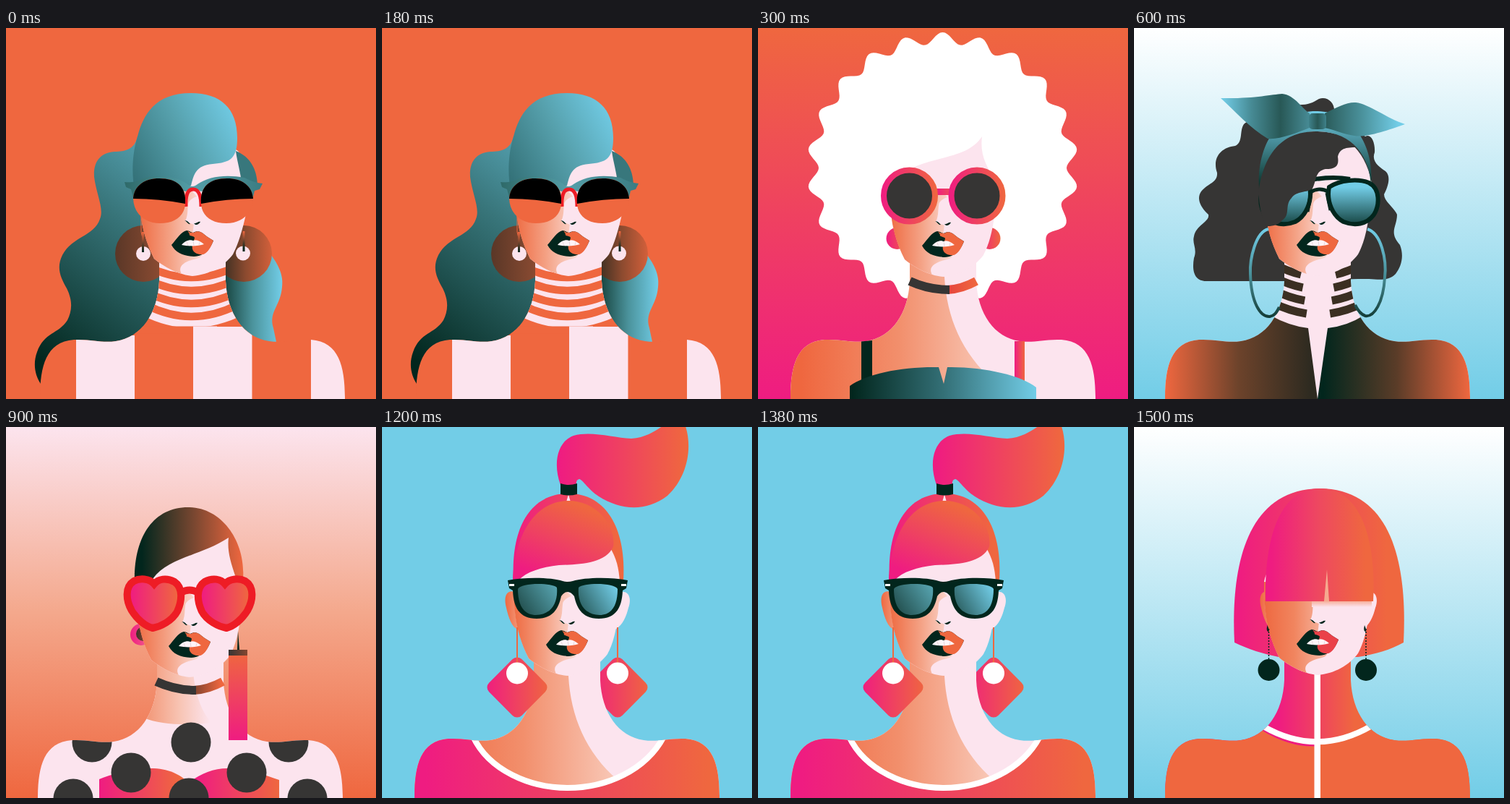
These frames come from a looping animation (512 px wide and 513 px high, 1.8 s). An HTML page:

```html
<!DOCTYPE html>
<html lang="en">
<head>
<meta charset="utf-8">
<title>Six portraits</title>
<style>
html, body { margin: 0; width: 100%; height: 100%; overflow: hidden; }
svg { display: block; width: 100%; height: 100%; }
</style>
</head>
<body>
<svg id="stage" viewBox="0 0 512 513" preserveAspectRatio="none"></svg>
<script>
const STEP = 300;
const CORAL = '#ef673f', PINK = '#fce4ee', MAGENTA = '#ef1c81', CYAN = '#72cde7';
const GREEN = '#02261d', COAL = '#363534', RED = '#ee1c25', WHITE = '#fff';

let defs = '', count = 0;

// Gradient between two points, stops evenly spread.
function lin(x1, y1, x2, y2, ...stops) {
  const id = 'g' + count++;
  const list = stops.map((c, i) => `<stop offset="${i / (stops.length - 1)}" stop-color="${c}"/>`).join('');
  defs += `<linearGradient id="${id}" gradientUnits="userSpaceOnUse" x1="${x1}" y1="${y1}" x2="${x2}" y2="${y2}">${list}</linearGradient>`;
  return `url(#${id})`;
}
const across = (x1, x2, ...stops) => lin(x1, 0, x2, 0, ...stops);
const down = (y1, y2, ...stops) => lin(0, y1, 0, y2, ...stops);

const shape = (d, fill) => `<path d="${d}" fill="${fill}"/>`;
const line = (d, stroke, width) => `<path d="${d}" fill="none" stroke="${stroke}" stroke-width="${width}"/>`;
const disc = (x, y, r, fill) => `<circle cx="${x}" cy="${y}" r="${r}" fill="${fill}"/>`;
const box = (x, y, w, h, fill) => `<rect x="${x}" y="${y}" width="${w}" height="${h}" fill="${fill}"/>`;
const back = fill => box(0, 0, 512, 513, fill);
const move = (x, y, s) => `<g transform="translate(${x} ${y})">${s}</g>`;
const flip = (axis, s) => `<g transform="translate(${2 * axis} 0) scale(-1 1)">${s}</g>`;

const BODY = 'M45 520V513C45 470 52 434 92 431C118 430 130 436 150 433C185 428 208 395 210 350V315H302V350C304 395 327 428 362 433C382 436 394 430 420 431C460 434 467 470 467 513V520Z';
defs += `<clipPath id="body"><path d="${BODY}"/></clipPath>`;

// Contents keep stage coordinates while the clip follows the body.
const inBody = (x, y, s) => move(x, y, `<g clip-path="url(#body)">${move(-x, -y, s)}</g>`);

const SKIN = across(60, 330, CORAL, '#f28f6c', '#f9cbbb');
const skin = () => inBody(0, 0, back(PINK) +
  shape('M40 520V310H200L258 344C261 400 282 450 326 488V520Z', SKIN));

const SHADE = across(186, 264, '#ef7048', '#f4a184', '#fbd6ce');

function lips(upper) {
  return shape('M227 301C234 293 240 283 248 281C252 281 254 284 257 284C262 281 268 282 273 287C278 291 282 293 285 295C281 305 275 316 258 317C243 316 233 312 227 301Z', GREEN) +
    shape('M249 281C253 285 255 283 258 284C262 281 268 282 273 287C278 291 282 293 285 295C281 305 277 312 271 314C262 315 254 310 256 302L259 291C258 288 250 289 252 286Z', upper) +
    shape('M241 301C245 296 252 293 257 295C262 293 267 296 272 300C264 303 250 303 241 301Z', '#fff4f8') +
    line('M248 297L250 302M257 295L258 302M266 297L265 301', '#d9c3cb', .6);
}

function face(x, y, { top = 'C190 165 300 130 331 215', shade = SHADE, upper = CORAL } = {}) {
  return move(x, y,
    shape(`M182 215${top}C328 270 322 295 312 314C300 330 280 342 256 344C235 342 215 330 203 320C186 285 183 260 182 215Z`, PINK) +
    shape('M182 215C182 262 187 288 203 320C212 328 228 337 241 341C234 329 248 323 262 320C268 318 270 316 268 312L256 284C258 278 257 275 258 273L246 268C250 260 249 252 250 245C250 240 256 236 262 234L254 225Z', shade) +
    shape('M245 267C248 268 250 273 253 272C251 270 249 267 245 267ZM258 271C261 272 264 268 267 269C264 274 260 274 258 271Z', GREEN) +
    lips(upper));
}

function ears(left, right) {
  return move(left, 0, shape('M184 228C172 224 168 235 172 250C176 268 182 280 190 280Z', across(170, 190, CORAL, '#f39a7b'))) +
    move(right, 0, shape('M330 228C341 226 346 236 341 250C337 266 331 276 322 280Z', PINK));
}

function choker(x, y, right) {
  return move(x, y, line('M262 362Q282 361 302 350', right, 12) + line('M210 350Q236 362 265 362', COAL, 12));
}

function waves() {
  const hair = lin(60, 470, 330, 110, GREEN, '#38757a', CYAN);
  const rim = across(165, 355, '#2f6a69', '#559fa9', '#3b7c82');
  const upper = 'C177 218 192 208 212 208C236 208 250 219 248 243';
  const lens = shape(`M176 236${upper}C247 260 234 270 213 270C192 270 177 257 176 236Z`, CORAL) +
    shape(`M176 236${upper}Q212 236 176 236Z`, '#000');
  const neck = [0, 1, 2, 3].map(i => line(`M194 ${329 + 18 * i}Q257 ${361 + 18 * i} 320 ${329 + 18 * i}`, CORAL, 10.5)).join('');
  return back(CORAL) +
    shape('M355 300C372 318 385 338 382 358C380 385 363 392 370 415L374 434L330 440L290 380V325Z', across(300, 382, '#143f39', '#4b939c', CYAN)) +
    shape('M182 150C178 168 165 171 150 171C126 173 121 190 122 206C125 230 136 250 130 264C122 288 92 288 78 314C69 332 76 346 84 360C93 378 91 392 85 404C72 424 53 420 43 448C37 464 40 480 48 492L60 460L220 450L230 220Z', hair) +
    disc(190, 312, 39, across(151, 220, '#5a3727', '#8f4d33')) +
    disc(329, 312, 39, across(295, 368, '#2e2a20', '#8b4a2f', '#d3603b')) +
    inBody(2, 0, back(CORAL) +
      shape('M185 310H330V396Q257 432 190 398Z', PINK) + neck +
      box(178, 412.5, 162, 10, CORAL) +
      box(97, 425, 81, 90, PINK) + box(259, 412.5, 81.5, 105, PINK) + box(422, 425, 60, 90, PINK) +
      shape('M292 412C305 410 315 405 322 398L340 413H292Z', CORAL)) +
    face(2, -1, { top: 'C190 180 300 150 320 172C328 190 333 200 336 230' }) +
    shape('M318 170C338 178 347 195 348 216H326C325 200 320 186 318 170Z', '#38777c') +
    shape('M178 225C174 205 174 175 182 150C190 120 206 90 256 90C297 90 320 111 320 152C320 181 310 186 286 188C262 190 260 203 256 218L230 225Z', lin(175, 200, 325, 120, '#35737a', '#56a0ac', CYAN)) +
    line('M187 250V282Q190 292 190 301', CORAL, 1) +
    disc(190, 312, 10, PINK) + disc(328, 311.5, 10, PINK) +
    box(188, 282, 3, 28, down(282, 310, CORAL, GREEN)) + box(327.5, 281, 3, 28, down(281, 305, CORAL, GREEN)) +
    shape('M164 213L166 220L173 223L177 238L212 220L249 226Q259 219 270 226L310 220L341 238L344 225L351 223L355 215C345 214 340 212 330 207C305 202 280 205 265 216C260 220 255 220 250 215C235 204 205 202 190 208C180 213 172 214 164 213Z', rim) +
    line('M249 247C248 228 253 223 259 223C266 223 270 229 270 247', RED, 5) +
    lens + flip(259, lens);
}

function afro() {
  let puff = '';
  for (let i = 0; i < 360; i++) {
    const a = i * Math.PI / 180, r = 179.5 + 8 * Math.cos(22 * a);
    puff += `${i ? 'L' : 'M'}${(255.5 + r * Math.sin(a)).toFixed(1)} ${(193.5 - r * Math.cos(a)).toFixed(1)}`;
  }
  const stud = x => disc(x, 291, 15, across(x - 15, x + 15, MAGENTA, CORAL));
  const ring = x => `<circle cx="${x}" cy="232" r="35.5" fill="${COAL}" stroke="${across(x - 39, x + 39, MAGENTA, CORAL)}" stroke-width="8"/>`;
  return back(down(0, 513, CORAL, MAGENTA)) + shape(puff + 'Z', WHITE) +
    stud(192.5) + stud(320.5) + skin() +
    face(0, 0, { top: 'C225 172 285 188 310 150C307 175 315 190 331 215' }) +
    choker(0, 0, across(262, 302, '#e6443c', CORAL)) +
    shape('M143 433.5L158 432V490H143Z', GREEN) +
    box(355, 433, 14, 55, across(355, 369, MAGENTA, CORAL)) +
    shape('M127 513V495C150 478 200 468 250 469L257 492L262 469C310 468 365 480 385 497V513Z', across(130, 385, GREEN, '#347077', CYAN)) +
    box(246, 222, 20, 9, across(246, 266, MAGENTA, '#ee4a5c')) + ring(209.5) + ring(303);
}

function bow() {
  const bar = '#3b2f22';
  const lens = `<path d="M270 220C285 210 310 208 325 214C341 222 340 245 332 258C322 272 305 274 290 268C275 260 266 240 270 220Z" fill="${down(220, 276, CYAN, '#0f3a35')}" stroke="${GREEN}" stroke-width="6"/>`;
  const bars = [0, 1, 2, 3].map(i => {
    const y = 332 + 18 * i;
    return line(`M192 ${y - 6}Q214 ${y + 5} ${231 + 2.6 * i} ${y + 9}`, bar, 11) +
      line(`M${279 - 2.6 * i} ${y + 9}Q296 ${y + 5} 318 ${y - 6}`, bar, 11);
  }).join('');
  const hoop = down(278, 398, CYAN, '#4b939d', '#153f3a');
  return back(down(0, 513, WHITE, CYAN)) +
    shape('M222 106C240 107 246 104 256 98C268 94 279 104 277 118L320 150C328 145 334 158 333 172C328 185 340 192 348 198C357 206 350 222 346 230C346 240 360 248 364 258C364 275 352 282 368 300C374 315 370 330 362 340C352 350 340 348 325 347L310 347L210 350L100 350C83 350 80 335 83 318C88 305 80 298 83 288C86 272 105 268 103 258C92 248 86 236 93 226C103 214 116 214 115 200C108 180 120 165 140 163C152 158 145 140 153 132C160 126 170 126 180 130Z', COAL) +
    inBody(-2, 0, back(PINK) + bars +
      shape('M30 425L190 398Q215 412 241 415L254 513V520H30Z', across(43, 245, CORAL, '#6d432b', '#2d2a20')) +
      shape('M475 425L317 398Q295 412 268 415L254 513V520H475Z', across(262, 465, GREEN, '#5a3c28', CORAL))) +
    face(-2, -1, { top: 'C190 130 310 110 331 215' }) +
    line('M186 278C168 282 160 320 161 340C162 380 175 400 188 399C194 398 197 394 201 386', hoop, 4) +
    line('M323 278C342 284 350 320 347 345C345 380 332 400 320 398C314 396 310 391 306 383', hoop, 4) +
    flip(256.5, lens) + lens +
    line('M248 209.500Q275 205 299 209', GREEN, 6) + line('M244 227Q257 219 270 227', GREEN, 5) +
    line('M245 228L240 254M267 228L272 252', GREEN, 5) +
    shape('M182 274C172 250 171 225 174 205C180 175 205 143 252 143C278 143 298 152 312 165C295 165 285 165 282 178C284 190 280 195 265 195C250 198 253 210 247 222C240 228 225 225 218 235C208 245 217 258 205 266C198 274 190 274 182 274Z', COAL) +
    shape('M173 222C170 160 200 115 252 115C305 115 333 165 328 218C326 180 305 143 252 143C200 143 180 180 173 222Z', down(115, 218, CYAN, '#3f818a', '#0b322a')) +
    shape('M120 97C165 98 190 92 205 91C222 92 235 114 243 118V138C225 145 200 155 185 153C160 138 140 115 120 97Z', across(122, 243, CYAN, '#478b95', '#285856', '#478b95')) +
    shape('M264 118C280 110 295 102 307 103C325 105 350 125 375 133C350 142 320 152 305 149C290 147 275 140 264 138Z', across(264, 366, '#2a5b5a', '#4a919b', CYAN)) +
    `<rect x="242" y="118" width="24" height="22" rx="5" fill="${across(242, 266, '#3f818a', '#285856', '#3f818a')}"/>`;
}

function hearts() {
  const heart = 'M205 217C198 209 185 209 177 213C164 221 166 240 174 254C182 267 194 276 203 278C214 276 230 268 237 255C244 240 245 222 233 214C222 208 211 210 205 217Z';
  const glass = (a, b) => `<path d="${heart}" fill="${across(172, 238, a, b)}" stroke="${RED}" stroke-width="10"/>`;
  const dots = [[119, 436], [391, 436], [256, 436], [173, 478], [333, 478], [93, 514], [417, 514], [253, 513]];
  return back(down(0, 513, PINK, '#f4a88c', CORAL)) +
    disc(187, 287, 15, across(172, 200, MAGENTA, '#f2658c')) + disc(190, 286, 10, across(180, 198, '#3e3028', '#9b4d34')) +
    inBody(-1, 2, back(PINK) +
      shape('M190 315H258C258 360 268 392 285 409C250 413 215 412 190 402Z', across(200, 283, '#f39d7f', '#f8c5b5', PINK)) +
      shape('M129 513V487C145 480 170 474 200 472C225 472 240 480 253 492V513Z', across(129, 240, MAGENTA, CORAL)) +
      shape('M253 513V492C270 478 290 471 310 472C340 474 360 482 378 488V513Z', across(262, 378, MAGENTA, CORAL)) +
      dots.map(([x, y]) => disc(x, y, 27.5, COAL)).join('')) +
    face(-2, 2, { top: 'C190 165 270 130 312 148C312 170 320 190 329 215' }) +
    choker(-2, 2, across(255, 300, '#6b3c2a', CORAL)) +
    shape('M178 210C178 150 205 111 252 111C300 111 332 160 328 210L318 208C310 185 306 170 308 153C270 178 225 180 203 210Z', across(188, 328, GREEN, '#764630', CORAL)) +
    glass(MAGENTA, CORAL) + flip(254, glass(CORAL, MAGENTA)) +
    line('M242 229Q254 222 266 229', RED, 10) +
    shape('M321 282L323 308H320Z', GREEN) +
    box(308, 308, 26, 125, down(312, 433, CORAL, MAGENTA)) + box(308, 308, 26, 8, across(308, 334, COAL, '#844630'));
}

function ponytail() {
  const tile = x => `<rect x="${x - 32}" y="328" width="64" height="64" rx="9" transform="rotate(45 ${x} 360)" fill="${lin(x - 32, 392, x + 32, 328, MAGENTA, CORAL)}"/>`;
  const drop = x => line(`M${x} 277V330`, CORAL, 2) + disc(x, 340.5, 15, WHITE);
  const neckline = 'M126 428C148 475 205 499 257 499C310 499 365 475 390 428';
  const lens = 'M188 224C192 215 235 215 242 222C244 245 232 260 213 260C195 260 188 245 188 224Z';
  return back(CYAN) + tile(326) + skin() +
    inBody(0, 0, shape(`${neckline}H480V520H30V428Z`, across(60, 450, MAGENTA, CORAL)) + line(neckline, WHITE, 8)) +
    ears(0, 0) +
    shape('M182 212C178 140 205 92 258 92C310 92 338 140 334 212Z', across(182, 325, MAGENTA, CORAL)) +
    face(0, 0, { top: 'C190 165 300 150 315 166C324 180 328 195 329 215' }) +
    shape('M181 212C184 150 210 103 258 102C300 102 324 140 320 165C310 190 270 190 245 191C220 194 200 200 189 212Z', lin(215, 205, 260, 102, MAGENTA, '#ee4360', CORAL)) +
    shape('M258 93L260.500 102H255.500Z', PINK) +
    shape('M247 80C236 50 243 20 265 12C290 5 320 15 345 16C365 15 378 5 388 -1H420C430 30 422 70 395 95C365 118 330 115 300 96C285 86 278 73 273 72Q268 73 269 80Z', across(245, 420, MAGENTA, CORAL)) +
    shape('M247 78Q258 82 270 78V93Q258 96 247 93Z', GREEN) +
    shape('M174 212C200 207 235 208 250 213Q257 215 264 213C280 208 315 207 340 212L338 223L333 226C332 252 322 265 300 265C278 265 270 252 266 234Q257 222 248 234C244 252 236 265 214 265C192 265 182 252 181 226L176 223Z', GREEN) +
    shape(lens, lin(190, 250, 242, 215, '#23504f', '#5aa9b6')) +
    flip(257, shape(lens, lin(240, 250, 190, 220, '#2c6062', CYAN))) +
    line('M176 218.500H183M331 218.500H338', WHITE, 3) +
    tile(187) + drop(187) + drop(326);
}

function bob() {
  const collar = 'M179 414Q254 457 329 413';
  const drop = x => `<path d="M${x} 279V322" stroke="${GREEN}" stroke-width="1.500" stroke-dasharray="2 2"/>` +
    shape(`M${x - 2} 274Q${x + 2} 283 ${x - 1} 283Q${x - 4} 282 ${x - 2} 274Z`, GREEN) + disc(x, 336, 15, GREEN);
  return back(down(0, 513, WHITE, CYAN)) +
    shape('M139 298C134 200 152 86 257 85C362 86 378 200 373 298C355 308 335 314 310 318H200C180 314 157 307 139 298Z', across(145, 350, MAGENTA, CORAL)) +
    inBody(-2, 0, back(across(200, 305, MAGENTA, CORAL)) +
      shape(`${collar}L480 425V520H30V425Z`, CORAL) +
      line('M179 419Q215 441 250 440', MAGENTA, 3) + line(collar, WHITE, 8)) +
    ears(4, -7) + box(249.500, 340, 8.5, 173, WHITE) +
    face(-2, -1, { shade: across(184, 264, '#ee6a42', '#f1855f', '#f6b49f'), upper: '#ea4149' }) +
    box(246, 241, 83, 8, down(241, 249, '#f6b09b', PINK)) +
    shape('M182 241C180 170 195 85 257 85C320 85 335 170 331 241Z', across(190, 320, MAGENTA, '#ee4860', CORAL)) +
    shape('M263 241L267 197L270 241Z', '#f6a98f') +
    drop(186.5) + drop(321);
}

const stage = document.getElementById('stage');
const scenes = [waves, afro, bow, hearts, ponytail, bob].map(draw => draw());
stage.innerHTML = `<defs>${defs}</defs>` +
  scenes.map((s, i) => `<g class="scene" display="${i ? 'none' : 'inline'}">${s}</g>`).join('');
const layers = [...stage.querySelectorAll('.scene')];

function tick() {
  const now = Math.floor(performance.now() / STEP) % layers.length;
  layers.forEach((layer, i) => layer.setAttribute('display', i === now ? 'inline' : 'none'));
  requestAnimationFrame(tick);
}
tick();
</script>
</body>
</html>
```
